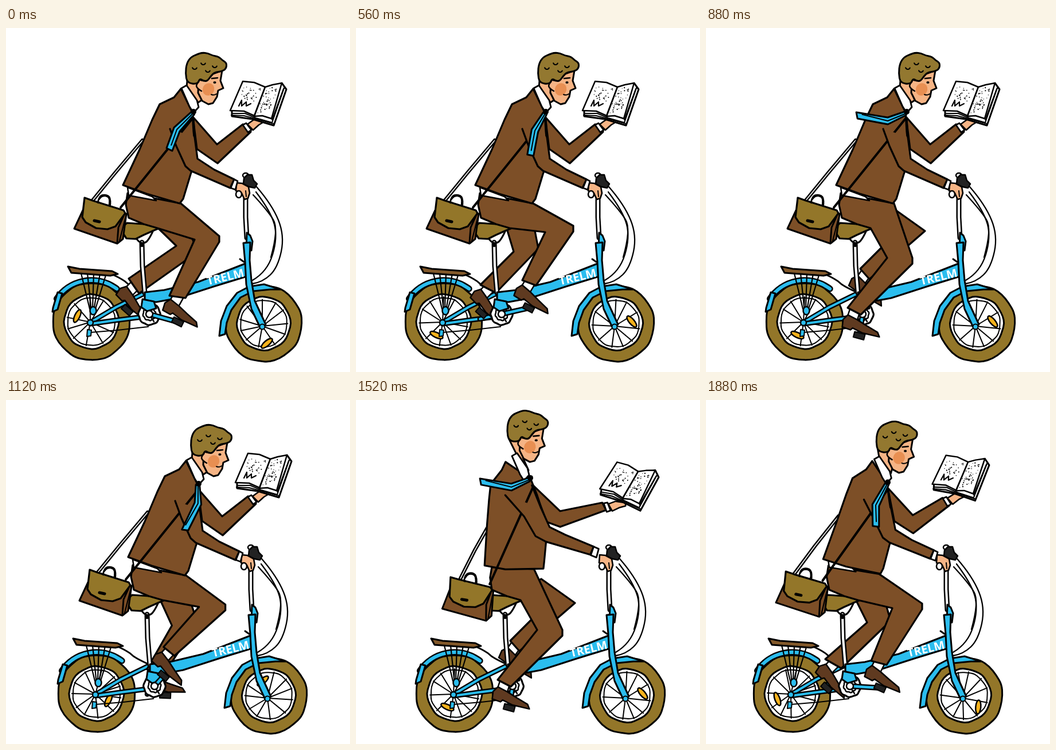
Recreate the animation shown at these times as an HTML page with a canvas. Size 600x600 px, loop 1920 ms.

```html
<!DOCTYPE html>
<html>
<head>
<meta charset="utf-8">
<style>
html, body { margin: 0; width: 100%; height: 100%; overflow: hidden; background: #fff; }
canvas { display: block; }
</style>
</head>
<body>
<canvas id="c" width="600" height="600"></canvas>
<script>
const g = document.getElementById('c').getContext('2d');
const LOOP = 1920, TURN = 640, STEP = 40, TAU = Math.PI * 2;
const INK = '#000', BROWN = '#7d4f27', SHOE = '#5f3a20', OLIVE = '#937629',
  BLUE = '#2bbdee', SKIN = '#f5b485', WHITE = '#fff', GOLD = '#f5b21c';

// cyclic Hermite curve through rows [time, values...]
function curve(rows, span, t) {
  const n = rows.length;
  const at = i => {
    const r = rows[((i % n) + n) % n];
    return [r[0] + Math.floor(i / n) * span, ...r.slice(1)];
  };
  let i = n - 1;
  while (rows[i][0] > t) i--;
  const a = at(i - 1), b = at(i), c = at(i + 1), d = at(i + 2);
  const h = c[0] - b[0], s = (t - b[0]) / h, s2 = s * s, s3 = s2 * s;
  return b.slice(1).map((p, k) => {
    k++;
    const m = (c[k] - a[k]) / (c[0] - a[0]) * h, q = (d[k] - b[k]) / (d[0] - b[0]) * h;
    return (2 * s3 - 3 * s2 + 1) * p + (s3 - 2 * s2 + s) * m + (3 * s2 - 2 * s3) * c[k] + (s3 - s2) * q;
  });
}

const SWAY = [[0, 0], [80, 7], [240, 23], [280, 26.5], [400, 14.5], [560, 4], [600, 1]];
const LEAN = [[0, 0], [1200, 0], [1360, .49], [1520, .92], [1640, 1], [1680, 1], [1800, .64], [1880, .22]];
// knee front, knee back, cuff back, cuff front, shoe angle
const NEAR = [
  [0, 372, 363, 329, 369, 285, 467, 313, 471, 26],
  [80, 350, 388, 306, 388, 268, 498, 296, 503, 1],
  [240, 337, 401, 293, 401, 224, 488, 247, 500, 15],
  [400, 369, 372, 325, 370, 246, 432, 262, 452, 45],
  [560, 375, 345, 326, 356, 286, 440, 310, 449, 28],
  [600, 376, 355, 324, 363, 287, 455, 314, 462, 24]];
const FAR = [
  [0, 335, 390, 297, 380, 214, 437, 232, 463, 42],
  [80, 350, 370, 293, 369, 217, 412, 233, 436, 40],
  [240, 359, 354, 308, 358, 246, 420, 262, 438, 32],
  [400, 338, 388, 292, 392, 255, 482, 283, 492, -25],
  [560, 314, 385, 271, 390, 213, 448, 240, 462, 42],
  [600, 321, 385, 280, 388, 207, 452, 235, 468, 42]];
// tie middle and tip, from the knot
const TIE = [
  [0, -28, 28, -41, 62], [80, -20, 35, -33, 78], [240, -32, 13, -85, 3],
  [400, 10, 32, -26, 73], [560, -18, 30, -26, 72], [600, -20, 37, -20, 73]];

function trace(p, closed, soft) {
  g.beginPath();
  const n = p.length / 2, X = i => p[(i % n) * 2], Y = i => p[(i % n) * 2 + 1];
  if (soft && closed) {
    g.moveTo((X(0) + X(n - 1)) / 2, (Y(0) + Y(n - 1)) / 2);
    for (let i = 0; i < n; i++) g.quadraticCurveTo(X(i), Y(i), (X(i) + X(i + 1)) / 2, (Y(i) + Y(i + 1)) / 2);
  } else {
    g.moveTo(X(0), Y(0));
    for (let i = 1; i < n; i++) {
      if (soft && i < n - 1) {
        const end = i === n - 2;
        g.quadraticCurveTo(X(i), Y(i), end ? X(n - 1) : (X(i) + X(i + 1)) / 2, end ? Y(n - 1) : (Y(i) + Y(i + 1)) / 2);
      } else g.lineTo(X(i), Y(i));
    }
  }
  if (closed) g.closePath();
}
function stroke(w, col = INK) { g.lineWidth = w; g.strokeStyle = col; g.stroke(); }
function shape(p, fill, w = 3, soft) {
  trace(p, true, soft);
  g.fillStyle = fill; g.fill();
  if (w) stroke(w);
}
function line(p, w = 3, col = INK, soft) { trace(p, false, soft); stroke(w, col); }
function tube(p, w, col, soft) { line(p, w + 5, INK, soft); line(p, w, col, soft); }
function oval(x, y, rx, ry, rot, fill, w) {
  g.beginPath(); g.ellipse(x, y, rx, ry, rot, 0, TAU);
  if (fill) { g.fillStyle = fill; g.fill(); }
  if (w) stroke(w);
}
function group(x, y, rot, draw, px = 0, py = 0) {
  g.save(); g.translate(x + px, y + py); g.rotate(rot); g.translate(-px, -py);
  draw(); g.restore();
}
const mix = (a, b, u) => a.map((v, i) => v + (b[i] - v) * u);

function ring(x, y, r, seed, fill, w) {
  const p = [];
  for (let i = 0; i < 22; i++) {
    const a = i / 22 * TAU, q = r + 1.1 * Math.sin(i * 2.3 + seed);
    p.push(x + q * Math.cos(a), y + q * Math.sin(a));
  }
  shape(p, fill, w, true);
}
function wheel(x, y, r, hx, hy, spin, gem, tilt, far) {
  ring(x, y, r, x, OLIVE, 3);
  ring(x, y, r - 20, 2, WHITE, 3);
  ring(x, y, r - 26, 4, WHITE, 2);
  for (let i = 0; i < 11; i++) {
    const a = spin + (i + .2 * Math.sin(i * 5)) / 11 * TAU;
    line([hx, hy, x + (r - 25) * Math.cos(a), y + (r - 25) * Math.sin(a)], 2);
  }
  const a = spin + gem;
  oval(hx + far * Math.cos(a), hy + far * Math.sin(a), 12, 4.5, a + tilt, GOLD, 2.5);
}

function shoe(k) {
  const x = (k[4] + k[6]) / 2, y = (k[5] + k[7]) / 2;
  group(x, y, k[8] * TAU / 360, () => {
    shape([10, 34, 29, 34, 29, 44, 10, 44], '#222', 2);
    shape([-8, -6, 10, -4, 9, 16, -9, 14], WHITE, 2.5);
    shape([-13, 32, -15, 19, -9, 9, 9, 13, 28, 19, 49, 25, 54, 32, 24, 33, 5, 29, 2, 33], SHOE, 2.5);
  });
}
function pedalSpot(k) {
  const a = k[8] * TAU / 360, c = Math.cos(a), s = Math.sin(a);
  return [(k[4] + k[6]) / 2 + 20 * c - 39 * s, (k[5] + k[7]) / 2 + 20 * s + 39 * c];
}

function rearBike(spin) {
  wheel(149, 512, 68, 147, 513, spin, 3.58, TAU / 4, 25);
  g.beginPath(); g.arc(149, 513, 73, -2.55, -.92); stroke(11); stroke(6, BLUE);
  shape([90, 461, 98, 463, 90, 491, 81, 495, 82, 488], BLUE, 3);
  for (let i = 0; i < 5; i++) line([131 + i * 11, 428, 146 + i * 2.5, 490], 2.2);
  shape([108, 416, 128, 420, 185, 424, 195, 429, 182, 432, 114, 427], '#83592a', 3);
  line([188, 431, 205, 439, 216, 450, 240, 461], 3, INK, true);
  tube([148, 513, 192, 487, 241, 463], 4, BLUE);
  tube([147, 516, 190, 510, 245, 503], 4, BLUE);
  line([147, 531, 195, 527, 248, 521], 2.2);
  shape([142, 526, 149, 527, 148, 537, 141, 538], BLUE, 2);
  oval(152, 493, 5.5, 7, 0, BLUE, 2.5);
  oval(147, 514, 5, 5, 0, BLUE, 2.5);
}

function frontBike(spin) {
  wheel(449.5, 515.5, 67, 447, 520, spin, 1.31, 1.13, 31);
  shape([372, 537, 375, 511, 385, 485, 403, 462, 424, 451, 450, 447, 479, 456, 461, 456, 431, 459, 409, 470, 393, 492, 385, 514, 382, 534], BLUE, 3);
  line([437, 277, 464, 308, 486, 362, 474, 418, 448, 443, 430, 446], 2.3, INK, true);
  line([436, 286, 462, 320, 474, 365, 456, 425, 430, 440], 2.3, INK, true);
  line([431, 291, 456, 318, 476, 350, 462, 400], 2.3, INK, true);
  tube([418, 290, 418, 330, 420, 366], 4, WHITE);
}

function frameBike() {
  tube([237, 374, 238, 415, 242, 462], 4, WHITE);
  line([224, 361, 229, 371, 238, 376, 248, 372, 256, 355], 3, INK, true);
  oval(237, 378, 4, 4, 0, INK);
  shape([242, 461, 276, 457, 335, 443, 417, 411, 424, 432, 362, 451, 300, 471, 262, 478, 242, 476], BLUE, 3.2);
  shape([420, 357, 426, 362, 430, 372, 428, 388, 419, 388], BLUE, 3);
  shape([414, 375, 426, 374, 425, 405, 428, 440, 434, 476, 453, 517, 444, 524, 428, 490, 419, 447, 417, 408], BLUE, 3);
  line([408, 403, 415, 408], 3);
  oval(447, 521, 4.5, 4.5, 0, BLUE, 2);
  group(383, 436, -.23, () => {
    g.font = 'bold 20px "Open Sans", "Noto Sans", sans-serif';
    g.textAlign = 'center'; g.textBaseline = 'middle'; g.fillStyle = WHITE;
    g.fillText('TRELM', 0, 0);
  });
}

function chainset(near) {
  ring(250, 499, 19, 1, WHITE, 3.2);
  ring(250, 499, 11, 3, WHITE, 2.5);
  line([240, 485, 258, 512], 2.5);
  shape([238, 473, 258, 477, 262, 489, 246, 494, 236, 487], BLUE, 3);
  tube([250, 499, ...pedalSpot(near)], 4.5, BLUE);
  oval(250, 499, 6, 6, 0, WHITE, 2.5);
}

function bag() {
  shape([134, 318, 119, 350, 194, 376, 204, 368, 210, 324], BROWN, 3);
  line([205, 328, 196, 348, 194, 374], 3);
  line([208, 332, 198, 371], 2.2);
  shape([137, 296, 151, 301, 205, 318, 208, 323, 191, 346, 177, 351, 157, 349, 139, 339, 133, 330], OLIVE, 3.2);
  line([161, 304, 163, 294, 173, 291, 182, 296, 181, 308], 4.5, INK, true);
  line([163, 302, 166, 297, 173, 295, 179, 298, 178, 306], 2, WHITE, true);
  line([154, 336, 163, 338], 5);
}

// seeded print marks for both pages
let seed = 7;
const rnd = () => (seed = seed * 16807 % 2147483647) / 2147483647;
const marks = Array.from({ length: 95 }, (_, i) => [i % 2, .1 + .8 * rnd(), .08 + .84 * rnd(), .6 + .55 * rnd()]);

function book(flip) {
  shape([394, 143, 394, 154, 430, 159, 467, 170, 489, 107, 481, 96, 430, 120], WHITE, 3);
  line([394, 149, 417, 149, 436, 157, 464, 165, 486, 102], 2.2);
  line([393, 152, 415, 153, 434, 158, 467, 167], 2.2);
  line([484, 106, 464, 160], 2);
  shape([413, 93, 433, 95, 452, 103, 433, 153, 415, 145, 391, 144], WHITE, 2.5);
  shape([452, 103, 465, 99, 481, 96, 463, 158, 447, 153, 433, 154], WHITE, 2.5);
  g.fillStyle = INK;
  for (const [side, s, v, r] of marks) {
    if (!side && v > .55) continue;
    const x = side ? 452 + 28 * s - 19 * v : 414 + 36 * s - 20 * v;
    const y = side ? 103 - 6 * s + 50 * v : 94 + 8 * s + 49 * v;
    g.beginPath(); g.arc(x, y, r, 0, TAU); g.fill();
  }
  line([406, 136, 411, 126, 411, 136, 419, 129, 419, 136, 427, 132], 2.2);
  if (flip > 0 && flip < 1) {
    const x = 452 + 31 * Math.cos(flip * Math.PI), y = 102 - 20 * Math.sin(flip * Math.PI);
    shape([452, 103, x + 3, y, x - 8, y + 32, 433, 153], WHITE, 2.3);
  }
}

function head() {
  shape([336, 90, 345, 92, 354, 88, 361, 80, 377, 74, 374, 92, 379, 105, 370, 109, 368, 120, 361, 131, 353, 133, 342, 127, 335, 113], SKIN, 3);
  oval(353, 107, 10, 11, .5, '#e88f52');
  shape([316, 96, 313, 79, 315, 62, 322, 51, 333, 46, 342, 43, 352, 44, 360, 48, 371, 50, 377, 56, 385, 61, 384, 71, 376, 76, 364, 77, 357, 84, 351, 93, 344, 92, 338, 88, 334, 98], '#937830', 3, true);
  oval(336, 100, 4, 6, .2, SKIN);
  line([336, 94, 331, 99, 334, 106, 341, 110], 2.5, INK, true);
  for (const [x, y] of [[329, 68], [344, 60], [352, 73], [364, 65]]) {
    g.beginPath(); g.arc(x, y, 4, .4, 2.8); stroke(2.2);
  }
  line([359, 88, 369, 87], 2.6);
  oval(364, 95, 2.6, 2, 0, INK);
  line([358, 116, 363, 118, 367, 115], 2, INK, true);
}

function rider(u, near, tie) {
  const m = (a, b) => mix(a, b, u);
  shoe(near);
  shape([...m([212, 288, 209, 308], [214, 292, 211, 310]), 214, 331, 240, 342, 264, 349,
    near[2], near[3], near[4], near[5], near[6], near[7], near[0], near[1] + 10, near[0], near[1],
    ...m([305, 306], [286, 294])], BROWN, 3.2);
  shape(m([212, 278, 255, 294, 262, 301, 214, 292], [212, 282, 250, 290, 255, 294, 214, 291]), WHITE, 2.5);

  const torso = m(
    [305, 106, 293, 121, 268, 133, 255, 160, 233, 212, 204, 274, 245, 289, 303, 306, 309, 298, 322, 255, 332, 228, 327, 180, 325, 147],
    [232, 108, 226, 122, 207, 148, 205, 175, 203, 220, 201, 290, 237, 296, 304, 293, 305, 280, 307, 250, 309, 220, 290, 165, 278, 137]);
  shape(torso, BROWN, 3.2);

  const hx = -79 * u, hy = -27 * u, cx = -62 * u, cy = -8 * u;
  shape([316 + hx, 92 + hy, 342 + hx, 96 + hy, 341 + hx, 126 + hy, 335 + cx, 130 + cy, 315 + cx, 104 + cy], SKIN, 3);
  group(cx, cy, 0, () => shape([306, 105, 315, 100, 333, 126, 336, 138, 327, 148, 320, 137], WHITE, 2.8));
  group(hx, hy, 0, head);

  line(m([325, 158, 200, 313], [283, 150, 211, 322]), 4);
  const arm = m(
    [286, 176, 297, 206, 313, 241, 322, 249, 391, 279, 398, 264, 363, 247, 334, 228, 329, 190],
    [233, 165, 268, 203, 288, 237, 307, 247, 385, 269, 391, 255, 340, 234, 313, 221, 297, 188]);
  shape(arm, BROWN, 0);
  line(arm.slice(0, 18), 3.2);
  line(m([327, 158, 329, 190], [280, 148, 297, 188]), 3.2);

  const [kx, ky] = m([326, 149], [276, 138]);
  const [mx, my, ex, ey] = tie, len = Math.hypot(ex, ey), nx = -ey / len, ny = ex / len;
  const off = (x, y, w) => [kx + x + nx * w, ky + y + ny * w];
  shape([...off(0, 0, -3), ...off(mx, my, -6), ...off(ex, ey, -6), ...off(ex * 1.02, ey * 1.02, 5), ...off(mx, my, 6), ...off(0, 0, 4)], BLUE, 3);
  line([kx, ky, ...off(mx, my, 0), ...off(ex * .9, ey * .9, 1)], 2);
  oval(kx + 1, ky - 3, 5, 5, 0, INK);
}

function draw(t) {
  const c = t % TURN;
  const [dx] = curve(SWAY, TURN, c), u = Math.max(0, curve(LEAN, LOOP, t)[0]);
  const near = curve(NEAR, TURN, c), far = curve(FAR, TURN, c), tie = curve(TIE, TURN, c);
  const spin = c / TURN * 2 * TAU;
  const m = (a, b) => mix(a, b, u);

  g.setTransform(1, 0, 0, 1, 0, 0);
  g.fillStyle = WHITE; g.fillRect(0, 0, 600, 600);
  g.lineJoin = g.lineCap = 'round';
  g.translate(dx, 0);

  tube(m([238, 196, 190, 253, 150, 302], [203, 226, 184, 262, 160, 312]), 1.5, WHITE);

  shape(m([326, 155, 368, 203, 413, 168, 427, 181, 369, 236, 333, 211], [281, 147, 330, 193, 406, 180, 412, 193, 330, 220, 308, 213]), BROWN, 3.2);
  group(-6 * u, 14 * u, u * .3, () => {
    shape([421, 168, 432, 160, 449, 158, 451, 163, 441, 169, 431, 178], SKIN, 2.5);
    shape([413, 169, 419, 166, 428, 178, 422, 182], WHITE, 2.8);
  }, 420, 174);
  group(14 * u, 21 * u, .18 * u, () => book((t - 1560) / 240), 440, 130);

  rearBike(spin);
  frontBike(spin);
  const [px, py] = pedalSpot(near);
  tube([250, 499, 250 - (px - 250) * .8, 499 - (py - 499) * .8], 4, BLUE);
  shoe(far);
  shape([256, 340, 300, 312, far[0], far[1], far[6], far[7], far[4], far[5], far[2], far[3]], BROWN, 3.2);
  frameBike();
  shape([203, 347, 211, 340, 240, 342, 273, 347, 258, 353, 240, 361, 226, 368, 210, 367, 204, 358], OLIVE, 3.2);
  chainset(near);
  rider(u, near, tie);
  group(8 * u, 12 * u, -.07 * u, bag, 165, 335);

  // grip, knob and hand
  oval(418, 257, 5, 4, 0, WHITE, 2.5);
  shape([415, 262, 421, 256, 429, 256, 432, 266, 438, 272, 434, 279, 424, 277, 414, 272], '#222', 2.5);
  shape([402, 270, 412, 271, 423, 277, 425, 288, 422, 297, 416, 299, 411, 288, 401, 284], SKIN, 2.6);
  line([418, 284, 419, 294], 2);
  oval(406, 290, 5, 6, 0, WHITE, 2.6);
  shape(m([392, 279, 398, 264, 404, 267, 400, 282], [386, 270, 391, 255, 400, 259, 396, 274]), WHITE, 2.8);
}

const start = performance.now();
function tick() {
  const ms = (performance.now() - start) % LOOP;
  draw(Math.floor(ms / STEP) * STEP);
  requestAnimationFrame(tick);
}
draw(0);
requestAnimationFrame(tick);
</script>
</body>
</html>
```
